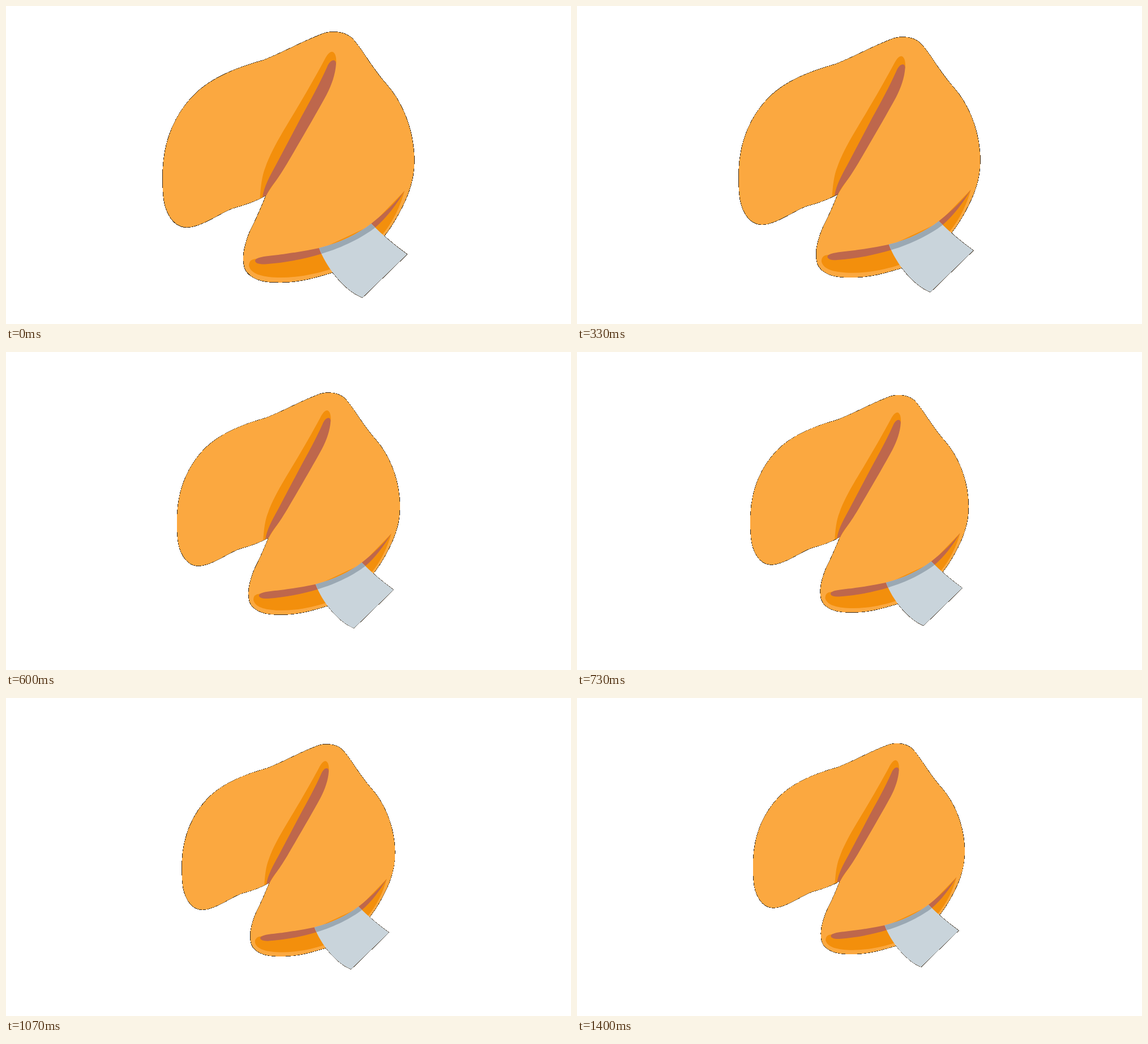
Recreate the animation shown at these times as an HTML page. Size 998 px wide and 561 px high, loop 1470 ms.

```html
<!DOCTYPE html>
<html lang="en">
<head>
<meta charset="utf-8">
<title>Fortune cookie</title>
<style>
  html, body { margin: 0; width: 100%; height: 100%; overflow: hidden; background: #fff; }
  svg { display: block; width: 100%; height: 100%; }
  .edge { fill: none; stroke: #3a2a18; stroke-width: 1.3; vector-effect: non-scaling-stroke; }
  .edge, .dough { shape-rendering: crispEdges; }
  .dough { fill: #fba840; }
  .inside { fill: #f38f0c; }
  .shade { fill: #be674c; }
</style>
</head>
<body>
<svg viewBox="0 0 998 561">
  <defs>
    <path id="shell" d="M459.5 334C440 345 422 351 403 356S345 391 319 390.5S280 360 278 335S277 300 277 290C279 235 300 190 331 158S410 108 455 95.5C490 82 520 64 557 50C570 44 594 43 609 55S644 107 672 138S720 218 721 268C721.5 290 719 305 712 326S686 384 667 407S610 460 577 470S520 487 488 487.5S443 484 431 475S419 452 419.5 440S427 404 435 389S452 352 459.5 334Z"/>
    <path id="slip" d="M553 427C590 418 622 402 645 384Q675 414 708.5 438L629.5 514.5C598 502 566 462 553 427Z"/>
  </defs>
  <g id="cookie">
    <use href="#shell" class="edge"/>
    <use href="#slip" class="edge"/>
    <use href="#shell" class="dough"/>
    <!-- upper fold -->
    <path class="inside" d="M448.5 339C450 318 452 300 458 285C468 255 492 217 510 187S548 122 562 96C568 84 573 80 577 81C583 83 584 95 583 102L497 277L459.5 334Z"/>
    <path class="shade" d="M453 337C456 318 466 300 477 280L522 195C538 166 553 139 567 108C573 93 583 93 583 102C582 120 575 140 566 157C548 190 520 238 497 277S470 314 460 334Z"/>
    <!-- lower opening -->
    <path class="inside" d="M429 458Q429 447 441 446L553 430L645 387L704 326C697 352 684 380 665 403L574 464C550 472 515 480 480 479C450 478 432 472 429 458Z"/>
    <path class="shade" d="M440 449C443 441 470 441 495 437Q525 433 553 427C590 418 622 402 645 384S690 345 704 326C690 350 672 374 652 391S595 426 558 437S490 453 458 455.5Q440 456 440 449Z"/>
    <use href="#slip" fill="#c9d4db"/>
    <path fill="#9aa8b3" d="M553 427C590 418 622 402 645 384L652 391C630 408 595 426 557.5 437Z"/>
  </g>
</svg>
<script>
const LOOP = 1470, FPS = 15, CX = 499, CY = 280.5;
const cookie = document.getElementById("cookie");

// Evenly spaced poses, three steps apart
const SPAN = 3;
const sizes = [1, .987, .943, .886, .861, .85, .842, .841];
const drops = [0, 0, -.5, -.6, -.6, .9, -2.8, -2.8];

// Smooth curve through evenly spaced points, level at both ends
function curve(points, x) {
  const at = k => points[Math.max(0, Math.min(points.length - 1, k))];
  const k = Math.floor(x), u = x - k;
  const a = at(k), b = at(k + 1);
  const ma = (b - at(k - 1)) / 2, mb = (at(k + 2) - a) / 2;
  const ease = u * u * (3 - 2 * u);
  return a + (b - a) * ease + u * (1 - u) * (ma * (1 - u) - mb * u);
}

// Each step starts on a whole hundredth of a second
function stepAt(t) {
  const i = Math.floor((t + 5) * FPS / 1000);
  return Math.round(i * 100 / FPS) * 10 > t ? i - 1 : i;
}

function draw(t) {
  const x = Math.min(stepAt(t % LOOP) / SPAN, sizes.length - 1);
  const dx = -Math.max(0, x - 6);
  cookie.setAttribute("transform",
    `translate(${CX + dx} ${CY + curve(drops, x)}) scale(${curve(sizes, x)}) translate(${-CX} ${-CY})`);
}

const start = performance.now();
function tick() {
  draw(performance.now() - start);
  requestAnimationFrame(tick);
}
tick();
</script>
</body>
</html>
```
